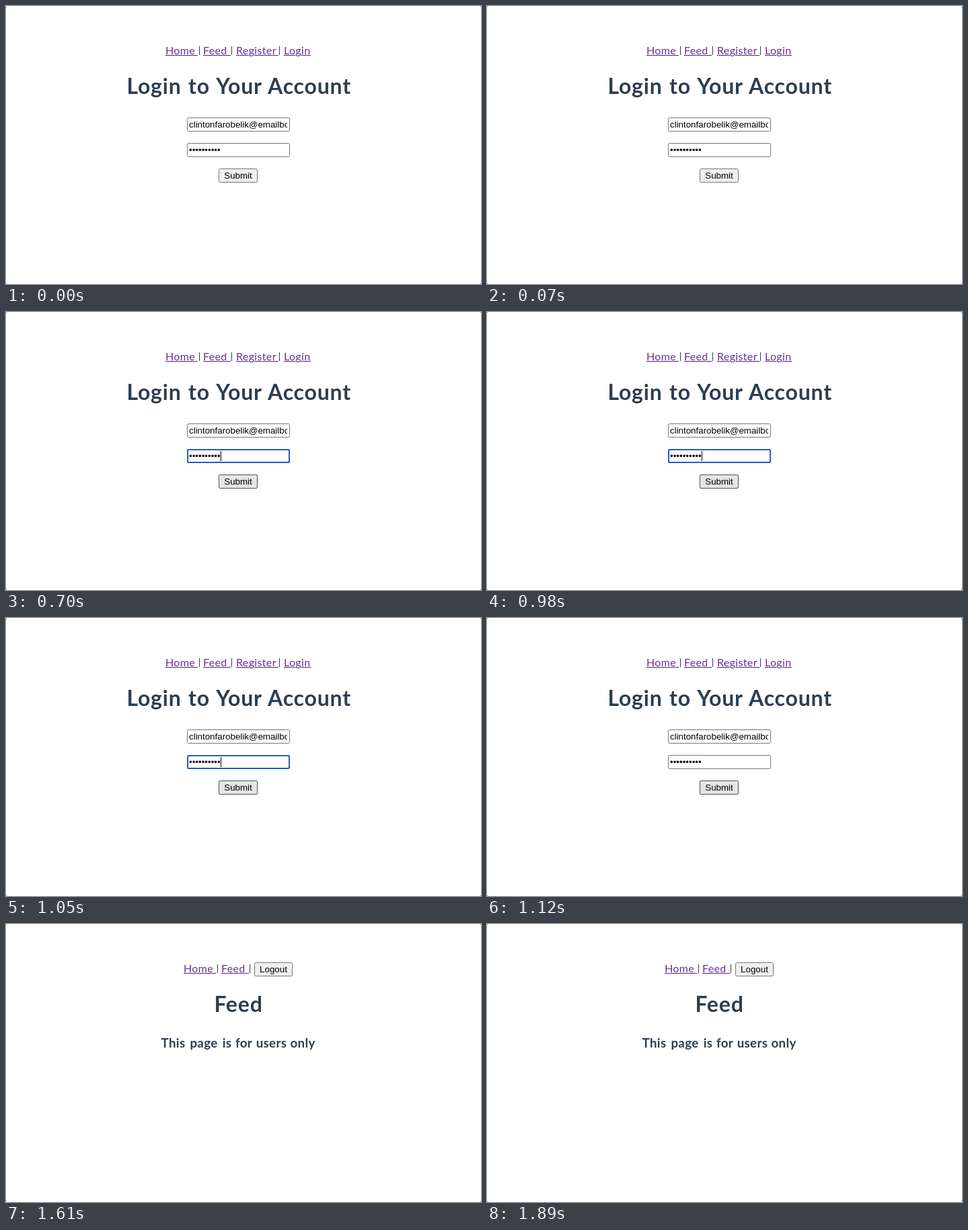
An HTML page for the animation above (3080 ms loop, 706 by 414 pixels).

```html
<!DOCTYPE html>
<html lang="en">
<head>
<meta charset="utf-8">
<title>Login flow</title>
<style>
  html, body { margin: 0; width: 100%; height: 100%; overflow: hidden; background: #fff; }
  svg { display: block; width: 706px; height: 414px; }
  text { font-family: Lato, sans-serif; fill: #2c3e50; }
  .link { font-size: 16px; letter-spacing: .35px; fill: #551a8b; fill-opacity: .9; stroke: #fff; stroke-width: 1.4px; paint-order: stroke; }
  .line { fill: #551a8b; }
  .bar { fill: #2c3e50; }
  .h1 { font-size: 32px; font-weight: 700; letter-spacing: .8px; text-anchor: middle; }
  .h3 { font-size: 18.72px; font-weight: 700; letter-spacing: .35px; text-anchor: middle; }
  .ui { font: 13.333px "Liberation Sans", Arial, sans-serif; fill: #000; }
  .mid { text-anchor: middle; }
  .field { fill: #fff; stroke: #767676; }
  .button { fill: #efefef; stroke: #767676; }
  .hover { fill: #e5e5e5; stroke: #4f4f4f; }
  .focus { fill: none; stroke: #1f5fc4; stroke-width: 2px; }
</style>
</head>
<body>
<svg id="stage" viewBox="0 0 706 414">
  <clipPath id="inner"><rect x="271" y="167" width="147" height="19"/></clipPath>
  <path d="M0 0h1v1h-1zM705 0h1v1h-1zM0 413h1v1h-1zM705 413h1v1h-1z" fill="#777"/>
  <g id="login"></g>
  <g id="feed"></g>
</svg>
<script>
const LOOP = 3080;
const login = document.getElementById('login');
const feed = document.getElementById('feed');

function add(parent, tag, attrs, text) {
  const el = document.createElementNS('http://www.w3.org/2000/svg', tag);
  for (const key in attrs) el.setAttribute(key, attrs[key]);
  if (text) el.textContent = text;
  parent.append(el);
  return el;
}

const label = (parent, cls, x, y, text) => add(parent, 'text', { class: cls, x, y }, text);
const fill = (parent, cls, x, y, width, height) => add(parent, 'rect', { class: cls, x, y, width, height });

// Rounded outline drawn inside the given box
function box(parent, cls, x, y, w, h, line = 1) {
  return add(parent, 'rect', {
    class: cls, x: x + line / 2, y: y + line / 2, width: w - line, height: h - line, rx: 2
  });
}

function link(parent, x, width, text) {
  fill(parent, 'line', x, 73, width, 1);
  label(parent, 'link', x, 72, text);
}

const bar = (parent, x) => fill(parent, 'bar', x, 60, 1, 13);

function words(parent, cls, y, list) {
  for (const [text, x] of list) label(parent, cls, x, y, text);
}

function button(parent, x, y, width, text) {
  const face = add(parent, 'g', {});
  box(face, 'button', x, y, width, 21);
  label(parent, 'ui mid', x + width / 2, y + 15, text);
  return face;
}

// Visible only from start to end (ms) within each loop
function show(el, start, end) {
  const frames = [{ offset: 0, opacity: start ? 0 : 1 }];
  if (start) frames.push({ offset: start / LOOP, opacity: 1 });
  if (end < LOOP) frames.push({ offset: end / LOOP, opacity: 0 });
  frames.push({ offset: 1, opacity: end < LOOP ? 0 : 1 });
  for (const f of frames) f.easing = 'steps(1, end)';
  el.animate(frames, { duration: LOOP, iterations: Infinity });
}

// Login page
link(login, 237, 48, 'Home');
bar(login, 287);
link(login, 293, 41, 'Feed');
bar(login, 335);
link(login, 342, 63, 'Register');
bar(login, 406);
link(login, 413, 40, 'Login');
words(login, 'h1', 131, [['Login', 220], ['to', 287], ['Your', 346.5], ['Account', 451]]);

box(login, 'field', 269, 166, 153, 21);
const email = label(login, 'ui', 272, 181, 'clintonfarobelik@emailbox');
email.setAttribute('clip-path', 'url(#inner)');

box(login, 'field', 269, 204, 153, 21);
label(login, 'ui', 272, 219, '•'.repeat(10));
const focus = add(login, 'g', {});
box(focus, 'focus', 269, 204, 153, 21, 2);
fill(focus, 'caret', 319, 207, 1, 15);

const submit = button(login, 316, 242, 58, 'Submit');
const hover = box(submit, 'button hover', 316, 242, 58, 21);

// Feed page
link(feed, 264, 48, 'Home');
bar(feed, 314);
link(feed, 320, 41, 'Feed');
bar(feed, 362);
button(feed, 369, 57, 57, 'Logout');
words(feed, 'h1', 131, [['Feed', 345.5]]);
words(feed, 'h3', 184, [
  ['This', 248.5], ['page', 294], ['is', 328.5], ['for', 353.5], ['users', 394.5], ['only', 441]
]);

show(login, 0, 1330);
show(focus, 560, 1120);
show(hover, 700, 1330);
show(feed, 1330, LOOP);
</script>
</body>
</html>
```
